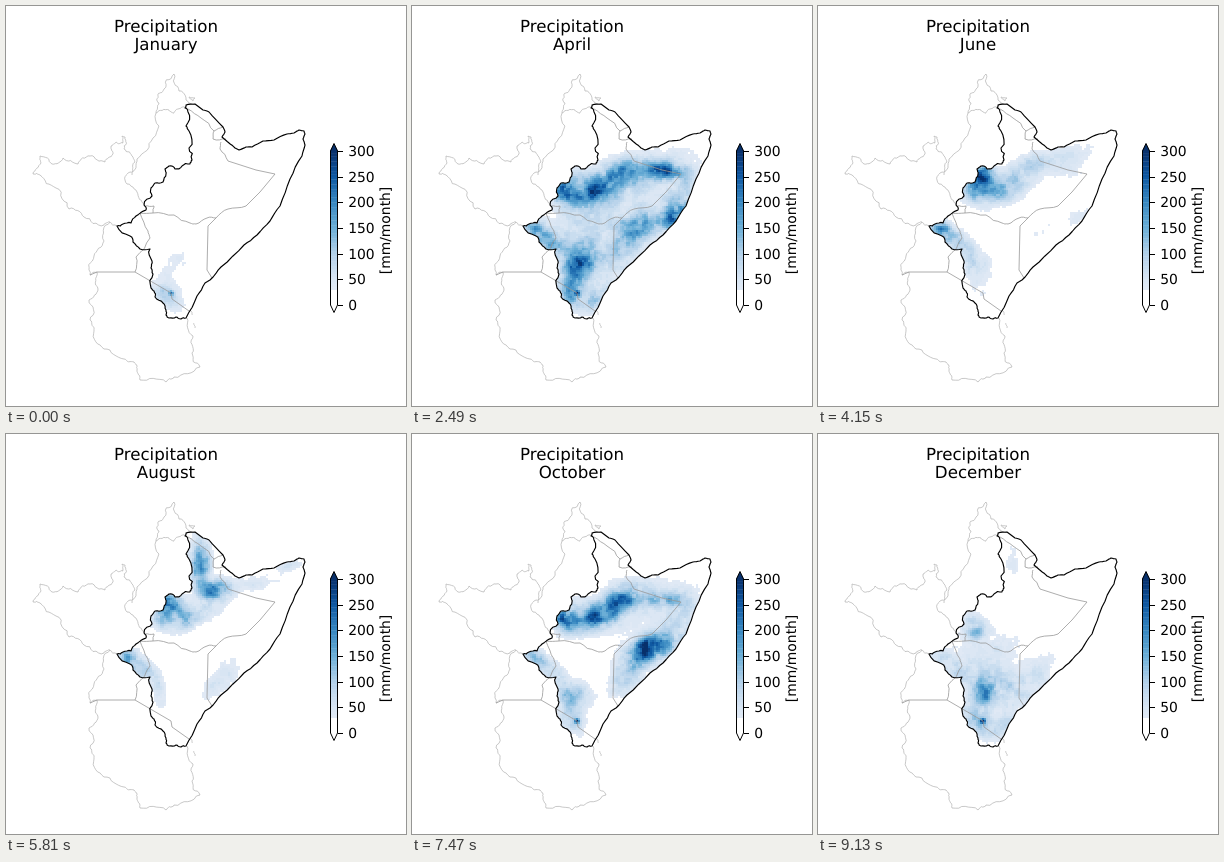
An HTML page with a canvas for the animation above (9.96 s loop, 400x400 px).

```html
<!DOCTYPE html>
<html lang="en">
<head>
<meta charset="utf-8">
<title>Monthly precipitation</title>
<style>
  html, body { margin: 0; width: 100%; height: 100%; overflow: hidden; background: #fff; }
  canvas, svg { position: absolute; left: 0; top: 0; width: 400px; height: 400px; }
  text { font: 13.89px "DejaVu Sans", Verdana, sans-serif; text-rendering: geometricPrecision; }
  .title { font-size: 16.67px; text-anchor: middle; }
  path { fill: none; stroke-linejoin: round; }
  .outer { stroke: #b0b0b0; stroke-width: .7; }
  .inner { stroke: #999; stroke-width: .8; }
  .basin { stroke: #000; stroke-width: 1.15; }
</style>
</head>
<body>
<canvas id="rain" width="400" height="400"></canvas>
<svg viewBox="0 0 400 400">
  <text class="title" x="160" y="26">Precipitation</text>
  <text class="title" x="160" y="44" id="month">January</text>
  <g id="borders"></g>
  <g id="bar"></g>
  <text transform="translate(384 224.5) rotate(-90)" text-anchor="middle">[mm/month]</text>
</svg>
<script>
const STEP = 830, CELL = 2, DRY = 30, MAX = 300;
const months = ["January", "February", "March", "April", "May", "June", "July",
  "August", "September", "October", "November", "December"];

// Each season is a bell curve over the year: peak month (January = 0) and width
const seasons = {
  dry: [0, .9], early: [2, .8], spring: [3.3, 1.25], summer: [6, 2.2],
  late: [7.2, 1.2], autumn: [9.2, 1.1], winter: [11, .8]
};
function strength(season, m) {
  const [peak, width] = seasons[season];
  const gap = Math.abs(m - peak), d = Math.min(gap, 12 - gap) / width;
  return Math.exp(-d * d);
}

// Rain centres: position, radii, tilt in degrees, mm per season
const places = [];
const place = (x, y, rx, ry, deg, rain) => places.push({ x, y, rx, ry, tilt: deg * Math.PI / 180, rain });

place(153, 185, 11, 11, 0, { early: 55, spring: 190, summer: 60, autumn: 200, winter: 35 });
place(163, 171, 13, 12, -30, { summer: 265 });
place(178, 186, 20, 12, -15, { spring: 135, summer: 115, autumn: 130 });
place(207, 168, 24, 13, -30, { spring: 120, summer: 75, autumn: 145 });
place(253, 164, 18, 9, 0, { spring: 180, autumn: 110 });
place(250, 149, 30, 10, -12, { summer: 55 });
place(283, 132, 16, 5, -12, { early: 40, late: 42, summer: 20 });
place(194, 128, 10, 24, 0, { early: 60, late: 190, winter: 35 });
place(209, 154, 14, 9, -15, { summer: 40, late: 140 });
place(122, 223, 13, 10, 35, { early: 45, spring: 110, summer: 195, autumn: 100, winter: 60 });
place(140, 238, 13, 11, 45, { spring: 100, summer: 110, autumn: 50, winter: 60 });
place(153, 258, 8, 19, -10, { summer: 75, autumn: 60 });
place(157, 198, 12, 9, -20, { winter: 100 });
place(166, 262, 14, 16, 0, { spring: 225, autumn: 85, winter: 110 });
place(160, 289, 19, 12, 45, { dry: 72, spring: 150, autumn: 75, winter: 90 });
place(178, 248, 26, 20, 30, { early: 52, spring: 70, winter: 85 });
place(206, 230, 14, 22, 20, { early: 62 });
place(214, 247, 30, 13, -50, { spring: 60, late: 58, autumn: 65, winter: 55 });
place(225, 221, 26, 15, -40, { spring: 130, autumn: 110 });
place(238, 213, 17, 11, -20, { autumn: 190 });
place(262, 210, 16, 9, -45, { spring: 205, autumn: 35 });
place(268, 190, 36, 18, -65, { spring: 75, autumn: 80 });
place(188, 290, 15, 10, -55, { early: 85, spring: 90, winter: 65 });
place(212, 175, 52, 22, -18, { early: 48, spring: 85, autumn: 60 });
place(175, 215, 42, 24, -10, { spring: 65, winter: 40 });
place(165, 287, 2.5, 2.5, 0, { dry: 90, early: 190, spring: 170, autumn: 180, winter: 180 });

const west = "111,220 117,218 125,217 130,210 140,204 138,199 146,190 145,182 149,177 157,176 160,168 159,163 163,160 169,163 176,160 184,158 186,154 183,142 183,125 180,120 182,106 179,102 180,99";
const coast = "180,99 189,98 197,104 203,106 217,121 219,126 216,131 223,137 229,142 233,144 240,141 246,141 257,135 268,134 281,128 288,127 293,124 298,125 299,128 297,133 299,139 296,150 284,173 274,200 264,215 251,229 238,239 215,261 204,274 199,277 191,290 180,312";
const south = "180,312 175,313 170,311 163,312 160,309 160,304 157,297 149,291 148,285 145,282 147,268 145,262 146,255 144,243 134,243 127,236 124,230 111,220";

const outer = [
  "111,220 104,216 98,219 78,211 63,203 50,182 34,169 27,168 35,157 34,150 46,158 57,152 72,158 84,150 99,156 107,148 105,140 110,136 117,137 116,130 119,131 118,143 127,151 129,156 127,165 119,174 131,186 139,199",
  "126,169 131,153 147,132 150,107 163,104 168,107 172,103 180,101",
  "150,107 153,97 152,88 158,83 168,68 173,85 183,97 189,98",
  "183,91 189,92 187,95 183,91",
  "104,216 98,235 88,250 84,269 91,266 92,283 83,294 84,314 88,325 98,343 118,353 128,356 131,364 134,374 160,376 168,371 194,361 186,347 187,330 181,312",
  "184,304 186,309", "188,317 189,322"
];
const inner = [
  "182,103 195,112 208,125 217,121",
  "208,125 207,133 220,133",
  "215,136 214,143 222,155",
  "147,207 168,209 184,217 190,218 201,212 210,212 222,203 240,200",
  "139,200 148,200 147,207 134,207 142,225 144,232 130,251 129,266"
];
const straight = [
  "222,155 250,164 269,168 254,186 240,200",
  "210,212 202,220 201,264 206,272",
  "84,269 91,266 129,266 165,287 166,293 183,305"
];

function random(seed) {
  return () => (seed = (seed * 16807) % 2147483647) / 2147483647;
}
const rnd = random(4271);

const points = s => s.split(" ").map(p => p.split(",").map(Number));
const trace = list => "M" + list.map(p => p.map(v => v.toFixed(1)).join(" ")).join("L");

// Midpoint displacement makes the surveyed lines irregular
function rough(list, amount, depth = 2) {
  if (!depth) return list;
  const out = [list[0]];
  for (let i = 1; i < list.length; i++) {
    const [ax, ay] = list[i - 1], [bx, by] = list[i];
    const k = (rnd() - .5) * amount;
    out.push([(ax + bx) / 2 - (by - ay) * k, (ay + by) / 2 + (bx - ax) * k], [bx, by]);
  }
  return rough(out, amount, depth - 1);
}

function add(parent, tag, attrs, label) {
  const el = document.createElementNS("http://www.w3.org/2000/svg", tag);
  for (const key in attrs) el.setAttribute(key, attrs[key]);
  if (label !== undefined) el.textContent = label;
  parent.append(el);
}

const borders = document.getElementById("borders");
const line = (d, kind) => add(borders, "path", { d, class: kind });
outer.forEach(s => line(trace(rough(points(s), .4, 3)), "outer"));
inner.forEach(s => line(trace(rough(points(s), .2)), "inner"));
straight.forEach(s => line(trace(points(s)), "inner"));
const basin = trace([
  ...rough(points(west), .4), ...rough(points(coast), .08), ...rough(points(south), .35)
]) + "Z";
line(basin, "basin");

// Colours for 0, 50, ... 300 mm
const ramp = [[236, 240, 248], [216, 229, 243], [178, 208, 233], [107, 174, 214],
  [55, 135, 192], [14, 88, 162], [8, 48, 107]];
function colour(mm) {
  if (mm < DRY) return "#fff";
  const v = Math.min(mm, MAX) / 50, i = Math.min(5, Math.floor(v));
  return `rgb(${ramp[i].map((c, n) => Math.round(c + (ramp[i + 1][n] - c) * (v - i)))})`;
}

const bar = document.getElementById("bar");
const barY = mm => 299 - mm * 154 / MAX;
for (let mm = 0; mm < MAX; mm += 5)
  add(bar, "rect", { x: 324, y: barY(mm + 5), width: 8, height: 2.9, fill: colour(mm + 2) });
add(bar, "path", { d: "M324 145L328 137.5L332 145Z", style: `fill:${colour(MAX)}` });
add(bar, "path", { d: "M324.5 145L328 137.5L331.5 145V299L328 306.5L324.5 299Z", stroke: "#000" });
for (let mm = 0; mm <= MAX; mm += 50) {
  const y = Math.round(barY(mm)) + .5;
  add(bar, "path", { d: `M332 ${y}h5`, stroke: "#000" });
  add(bar, "text", { x: 342.2, y: y + 4.8 }, mm);
}

function hash(x, y, s) {
  let h = Math.imul(x, 374761393) + Math.imul(y, 668265263) + Math.imul(s, 1274126177);
  h = Math.imul(h ^ (h >>> 13), 1103515245);
  return ((h ^ (h >>> 16)) >>> 0) / 4294967296;
}
function noise(x, y, s) {
  const ix = Math.floor(x), iy = Math.floor(y);
  const ease = t => t * t * (3 - 2 * t);
  const mix = (a, b, t) => a + (b - a) * t;
  const u = ease(x - ix), v = ease(y - iy);
  return mix(mix(hash(ix, iy, s), hash(ix + 1, iy, s), u),
             mix(hash(ix, iy + 1, s), hash(ix + 1, iy + 1, s), u), v);
}

function rainAt(x, y, blobs, seed) {
  let sum = 0;
  for (const b of blobs) {
    const c = Math.cos(b.tilt), s = Math.sin(b.tilt), dx = x - b.x, dy = y - b.y;
    const u = (dx * c + dy * s) / b.rx, v = (dy * c - dx * s) / b.ry;
    sum += b.mm * Math.exp(-u * u - v * v);
  }
  const grain = .35 * noise(x / 12, y / 12, seed) + .35 * noise(x / 6, y / 6, seed + 50)
    + .3 * noise(x / 3, y / 3, 99);
  return sum * (.4 + 1.3 * grain);
}

function paint(name, m) {
  const sheet = document.createElement("canvas");
  sheet.width = sheet.height = 400;
  const g = sheet.getContext("2d");
  g.clip(new Path2D(basin));
  const blobs = places.map(p => ({
    ...p, mm: Object.keys(p.rain).reduce((sum, s) => sum + p.rain[s] * strength(s, m), 0)
  })).filter(b => b.mm > 8);
  for (let y = 96; y < 316; y += CELL)
    for (let x = 108; x < 302; x += CELL) {
      const mm = rainAt(x + 1, y + 1, blobs, m + 3);
      if (mm < DRY) continue;
      g.fillStyle = colour(Math.floor(mm / 10) * 10);
      g.fillRect(x, y, CELL, CELL);
    }
  return sheet;
}

const sheets = months.map(paint);
const ctx = document.getElementById("rain").getContext("2d");
const label = document.getElementById("month");
const start = performance.now();
let shown = -1;

function frame() {
  const n = Math.floor((performance.now() - start) / STEP) % months.length;
  if (n !== shown) {
    shown = n;
    label.textContent = months[n];
    ctx.clearRect(0, 0, 400, 400);
    ctx.drawImage(sheets[n], 0, 0);
  }
  requestAnimationFrame(frame);
}
frame();
</script>
</body>
</html>
```
